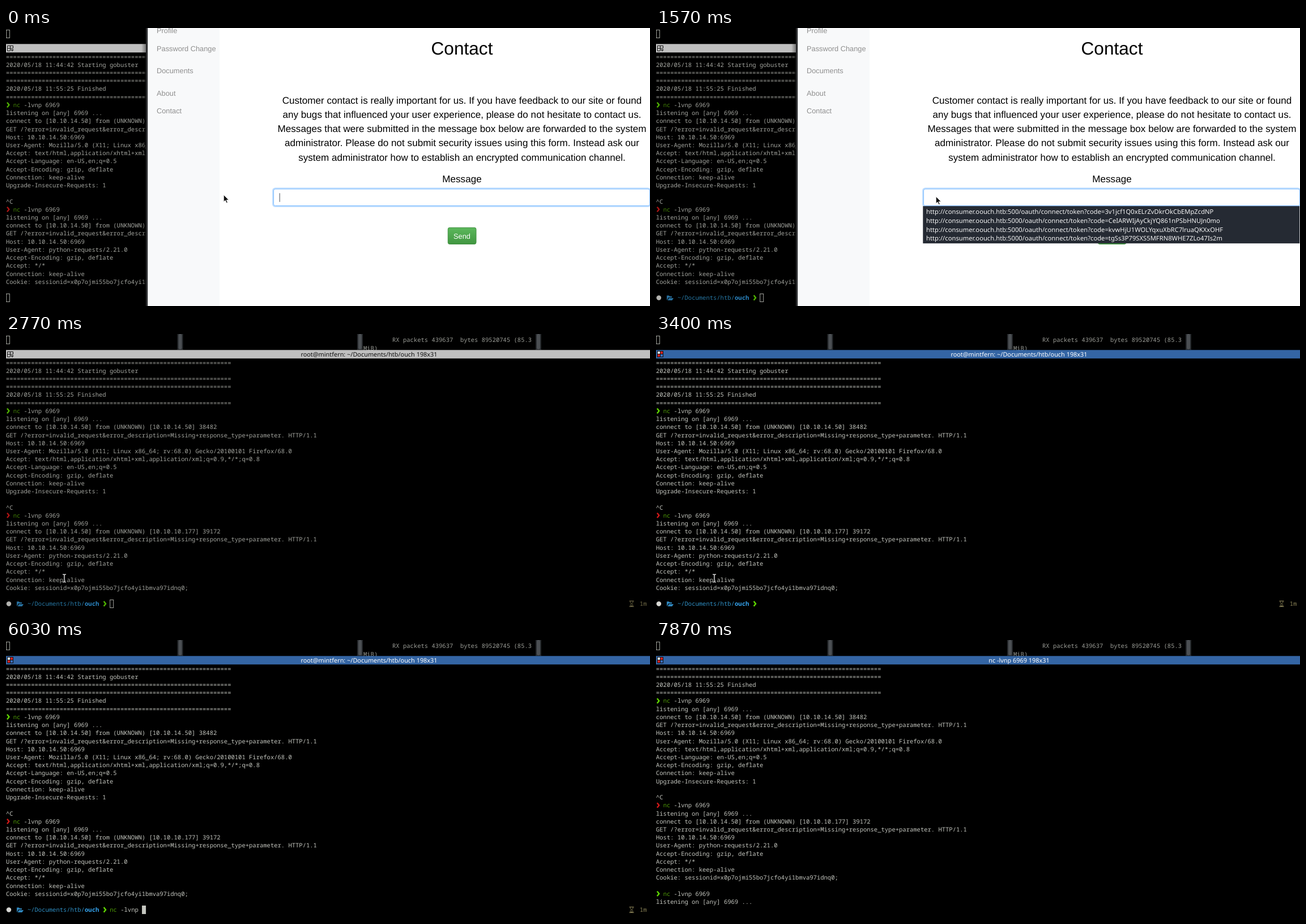
These frames come from a looping animation (1137 px wide and 492 px high, 8 s). An HTML page:

```html
<!DOCTYPE html>
<html lang="en">
<head>
<meta charset="utf-8">
<title>Contact form and listener</title>
<style>
  html, body { margin: 0; width: 100%; height: 100%; overflow: hidden; background: #000; }
  svg { display: block; width: 1137px; height: 492px; }
  text { white-space: pre; text-rendering: geometricPrecision; }
  .mono { font: 10.53px "Noto Sans Mono", "DejaVu Sans Mono", monospace; }
  .bold { font-weight: 700; }
  .ui { font-family: "Noto Sans", "Open Sans", sans-serif; }
  .web { font-family: "Liberation Sans", Arial, sans-serif; }
</style>
</head>
<body>
<svg id="stage" viewBox="0 0 1137 492"></svg>
<script>
const LOOP = 8000;
const COL = 6.32, ROW = 14.22, TOP = 50.8;
const INK = '#c4c6bf', GREEN = '#4e9a06', LIME = '#5fd700', RED = '#d01818';
const stage = document.getElementById('stage');

function el(tag, attrs = {}, parent = stage, text) {
  const node = document.createElementNS('http://www.w3.org/2000/svg', tag);
  for (const key in attrs) node.setAttribute(key, attrs[key]);
  if (text !== undefined) node.textContent = text;
  return parent.appendChild(node);
}
const group = (parent = stage) => el('g', {}, parent);
const rect = (x, y, width, height, fill, parent, more) =>
  el('rect', { x, y, width, height, fill, ...more }, parent);
const path = (d, attrs, parent) => el('path', { d, fill: 'none', ...attrs }, parent);
const show = (node, on) => { node.style.display = on ? '' : 'none'; };
const rowY = row => TOP + row * ROW;

function gradient(id, x2, y2, from, to, parent) {
  const node = el('linearGradient', { id, x2, y2 }, parent);
  el('stop', { offset: 0, 'stop-color': from }, node);
  el('stop', { offset: 1, 'stop-color': to }, node);
}
function mono(col, row, text, parent, fill = INK, bold = false) {
  return el('text', { x: col * COL, y: rowY(row) + 3.8, fill, class: bold ? 'mono bold' : 'mono' }, parent, text);
}
function chevron(col, row, color, parent) {
  const x = col * COL + 2, y = rowY(row);
  path(`M${x} ${y - 4.3}L${x + 3.4} ${y}L${x} ${y + 4.3}`, { stroke: color, 'stroke-width': 2.4 }, parent);
}
function command(row, color, parent) {
  chevron(0, row, color, parent);
  mono(2, row, 'nc', parent, GREEN);
  mono(5, row, '-lvnp 6969', parent);
}

// Terminal
rect(0, 0, 1137, 492, '#000');
const term = group();
const lines = group(term);

const rule = '='.repeat(63);
const getLine = 'GET /?error=invalid_request&error_description=Missing+response_type+parameter. HTTP/1.1';
const output = [
  rule,
  '2020/05/18 11:44:42 Starting gobuster',
  rule, rule,
  '2020/05/18 11:55:25 Finished',
  rule,
  null,
  'listening on [any] 6969 ...',
  'connect to [10.10.14.50] from (UNKNOWN) [10.10.14.50] 38482',
  getLine,
  'Host: 10.10.14.50:6969',
  'User-Agent: Mozilla/5.0 (X11; Linux x86_64; rv:68.0) Gecko/20100101 Firefox/68.0',
  'Accept: text/html,application/xhtml+xml,application/xml;q=0.9,*/*;q=0.8',
  'Accept-Language: en-US,en;q=0.5',
  'Accept-Encoding: gzip, deflate',
  'Connection: keep-alive',
  'Upgrade-Insecure-Requests: 1',
  '',
  '^C',
  null,
  'listening on [any] 6969 ...',
  'connect to [10.10.14.50] from (UNKNOWN) [10.10.10.177] 39172',
  getLine,
  'Host: 10.10.14.50:6969',
  'User-Agent: python-requests/2.21.0',
  'Accept-Encoding: gzip, deflate',
  'Accept: */*',
  'Connection: keep-alive',
  'Cookie: sessionid=x0p7ojmi55bo7jcfo4yi1bmva97idnq0;'
];
output.forEach((text, row) => { if (text) mono(0, row, text, lines); });
command(6, LIME, lines);
command(19, RED, lines);

const sent = group(lines);
command(30, LIME, sent);
const listening = mono(0, 31, 'listening on [any] 6969 ...', lines);

const prompt = group(term);
el('circle', { cx: 5, cy: 477.5, r: 4.2, fill: '#d8d8d4' }, prompt);
path('M19 482V473.5H23L24.3 475H28V477H22L19 482ZM20.5 482L22.8 478H31L28.5 482Z', { fill: '#2f86bd' }, prompt);
mono(6, 30, '~/Documents/htb/', prompt, '#2f8fc4');
mono(22, 30, 'ouch', prompt, '#35a5f0', true);
chevron(27, 30, LIME, prompt);
const typedName = mono(29, 30, '', prompt);
const typedArgs = mono(31, 30, '', prompt);
const hourglass = '#8c8458';
path('M1100.5 472.5H1108.5M1100.5 482.5H1108.5M1102 473C1102 477 1104 476.5 1104 477.5S1102 478 1102 482M1107 473C1107 477 1105 476.5 1105 477.5S1107 478 1107 482',
  { stroke: hourglass }, prompt);
path('M1103 482L1104.5 479.5L1106 482Z', { fill: hourglass }, prompt);
mono(177, 30, '1m', prompt, hourglass);

const cursor = rect(0, 470.5, 6, 14, INK, term, { stroke: INK });

// Panes above the title bar
const panes = group();
rect(0, 0, 1137, 28.3, '#000', panes);
rect(0.5, 3.5, 6, 14, 'none', panes, { stroke: '#a0a29c' });
for (const x of [302.5, 620, 935]) {
  rect(x, 0, 10, 28, '#25282b', panes);
  rect(x + 2, 0, 6, 27, '#4b4f53', panes, { rx: 2 });
}
const packets = { fill: '#9a9c96', class: 'mono' };
el('text', { x: 682, y: 14.3, ...packets }, panes, 'RX packets 439637  bytes 89520745 (85.3');
el('text', { x: 631, y: 28.5, ...packets }, panes, 'MiB)');

const bar = rect(0, 28.3, 1137, 15, '#c0c0c0');
const title = el('text', { x: 641, y: 40, 'text-anchor': 'middle', 'font-size': 10.9, class: 'ui' });

const plainIcon = group(), activeIcon = group();
path('M2.5 31.5H12.5V36M2.5 31.5V40.5H7M7.5 31.5V40.5M2.5 36H12.5M9 38.5H13L11 41Z', { stroke: '#111' }, plainIcon);
rect(2, 30, 11, 11, '#111', activeIcon);
rect(3, 31, 4, 4, '#e8e8e8', activeIcon);
rect(8, 31, 4, 4, '#d22', activeIcon);
rect(3, 36, 4, 4, '#d22', activeIcon);
rect(8, 36, 4, 4, '#3a6fc0', activeIcon);

// Browser
const page = group();
const web = (x, y, size, fill, text, anchor = 'start', parent = page) =>
  el('text', { x, y, fill, 'font-size': size, 'text-anchor': anchor, class: 'web' }, parent, text);

gradient('shade', 1, 0, '#0000', '#0006', page);
rect(239, 0, 8, 492, 'url(#shade)', page);
rect(247, 0, 890, 492, '#fff', page);
rect(247, 0, 3.5, 492, '#2b2c2e', page);
rect(250.5, 0, 126.5, 492, '#f8f9fa', page);
[['Profile', 9.2], ['Password Change', 40.6], ['Documents', 80.3], ['About', 119.8], ['Contact', 151.3]]
  .forEach(([text, y]) => web(266, y, 12.8, '#8f8f8f', text));

web(805, 47.3, 31.6, '#000', 'Contact', 'middle');
[
  'Customer contact is really important for us. If you have feedback to our site or found',
  'any bugs that influenced your user experience, please do not hesitate to contact us.',
  'Messages that were submitted in the message box below are forwarded to the system',
  'administrator. Please do not submit security issues using this form. Instead ask our',
  'system administrator how to establish an encrypted communication channel.'
].forEach((text, i) => web(805, 133.5 + i * 25.25, 17.1, '#000', text, 'middle'));
web(805, 272.5, 17.1, '#000', 'Message', 'middle');

rect(471.5, 284, 665.5, 31.5, 'none', page, { rx: 4, stroke: '#bfdeff', 'stroke-width': 3 });
rect(472.5, 285, 664, 29.5, '#fff', page, { rx: 3, stroke: '#80bdff' });
const fieldClip = el('clipPath', { id: 'field' }, page);
rect(482.5, 286, 646, 28, '#000', fieldClip);
const fieldBox = el('g', { 'clip-path': 'url(#field)' }, page);
const fieldText = web(1127, 304.4, 12.85, '#495057',
  'K3zLZEuwIqFv41mova69N6rmRbwwXjD5ba2r1VQ1ti3TKYCVdcDwqgzZrjCIUIkV6irJUKy97HEY0PtOJg78qtV7qs', 'end', fieldBox);
const caret = rect(482.7, 292.3, 1, 15.5, '#495057', page);

gradient('send', 0, 1, '#5cb85c', '#419641', page);
rect(780.3, 353.3, 49.7, 29.2, 'url(#send)', page, { rx: 3, stroke: '#3e8f3e' });
web(805, 373, 12.85, '#fff', 'Send', 'middle');

const popup = group(page);
rect(471.3, 315.2, 665, 66, '#252a33', popup);
[
  '500/oauth/connect/token?code=3v1jcf1Q0xELrZvDkrOkCbEMpZcdNP',
  '5000/oauth/connect/token?code=CeIARWIjAyCkjYQ861nPSbHNUJn0mo',
  '5000/oauth/connect/token?code=kvwHjU1WOLYqxuXbRC7lruaQKXxOHF',
  '5000/oauth/connect/token?code=tgSs3P79SXS5MFRN8WHE7ZLo47Is2m'
].forEach((tail, i) => el('text',
  { x: 477, y: 329 + i * 15.75, fill: '#f4f4f4', 'font-size': 11.22, class: 'ui' },
  popup, 'http://consumer.oouch.htb:' + tail));

// Pointers, both with their origin at the hot spot
const arrow = group(), beam = group();
path('M0 0V12.5L2.9 9.8L5 14.4L7 13.5L5 9.1H9Z', { fill: '#111', stroke: '#fff', 'stroke-width': 0.8 }, arrow);
const beamShape = 'M-3 -6.5H-1L0 -5.5L1 -6.5H3M0 -5.5V6M-3 7H-1L0 6L1 7H3';
path(beamShape, { stroke: '#333', 'stroke-width': 2.6 }, beam);
path(beamShape, { stroke: '#e4e4e4', 'stroke-width': 1.2 }, beam);

// Timing
const PASTE = 2000, SWITCH = 2770, FOCUS = 2870, ENTER = 7200, LISTEN = 7430;
const moves = [
  [0, 384.3, 295.3], [30, 384.3, 295.3], [370, 437, 212], [570, 437, 212], [830, 497, 270],
  [1569, 497, 270], [1570, 494.3, 298.2], [1730, 494.3, 298.2], [2000, 499, 302],
  [2470, 482, 352], [2570, 482, 352], [2700, 103, 432], [7629, 103, 432], [7630, 208, 105]
];
const typing = [
  [0, ''], [3770, 'n'], [4000, 'nc'], [4130, 'nc -'], [5230, 'nc -l'], [5370, 'nc -lv'],
  [5500, 'nc -lvnp'], [6030, 'nc -lvnp '], [6600, 'nc -lvnp 6'], [6770, 'nc -lvnp 69'],
  [7000, 'nc -lvnp 6969']
];
const cursorOff = [[3400, 3770], [4700, 5230], [7870, LOOP]];
const within = (t, [from, to]) => t >= from && t < to;

function pointerAt(t) {
  const next = moves.findIndex(([time]) => time > t);
  if (next < 0) return moves[moves.length - 1].slice(1);
  const [t0, x0, y0] = moves[next - 1], [t1, x1, y1] = moves[next];
  const k = (t - t0) / (t1 - t0);
  return [x0 + (x1 - x0) * k, y0 + (y1 - y0) * k];
}

function render(t) {
  const focused = t >= FOCUS, entered = t >= ENTER, ready = t >= 1570;
  const scroll = entered + (t >= LISTEN);

  lines.setAttribute('transform', `translate(0 ${-scroll * ROW})`);
  term.setAttribute('opacity', focused ? 1 : 0.83);
  show(sent, entered);
  show(listening, t >= LISTEN);
  show(prompt, ready && !entered);

  const typed = typing.filter(([time]) => time <= t).pop()[1];
  typedName.textContent = typed.slice(0, 2);
  typedName.setAttribute('fill', typed.length < 2 ? RED : GREEN);
  typedArgs.textContent = typed.slice(2);

  const col = ready && !entered ? 29 + typed.length : 0;
  cursor.setAttribute('x', col * COL + 0.4);
  cursor.setAttribute('fill', focused ? INK : 'none');
  show(cursor, !cursorOff.some(span => within(t, span)));

  bar.setAttribute('fill', focused ? '#3465a4' : '#c0c0c0');
  title.setAttribute('fill', focused ? '#fff' : '#111');
  title.textContent = (entered ? 'nc -lvnp 6969' : 'root@mintfern: ~/Documents/htb/ouch') + ' 198x31';
  show(plainIcon, !focused);
  show(activeIcon, focused);

  show(page, t < SWITCH);
  show(popup, within(t, [1570, PASTE]));
  show(fieldText, t >= PASTE);
  show(caret, t < 370 || t >= PASTE);
  caret.setAttribute('x', t < PASTE ? 482.7 : 1127);

  const [x, y] = pointerAt(t);
  const isBeam = x < 247 || (t >= PASTE && y < 315);
  const visible = t < 3770 || within(t, [7630, 7870]);
  show(arrow, visible && !isBeam);
  show(beam, visible && isBeam);
  (isBeam ? beam : arrow).setAttribute('transform', `translate(${x} ${y})`);
}

const start = performance.now();
function tick() {
  render((performance.now() - start) % LOOP);
  requestAnimationFrame(tick);
}
tick();
</script>
</body>
</html>
```
